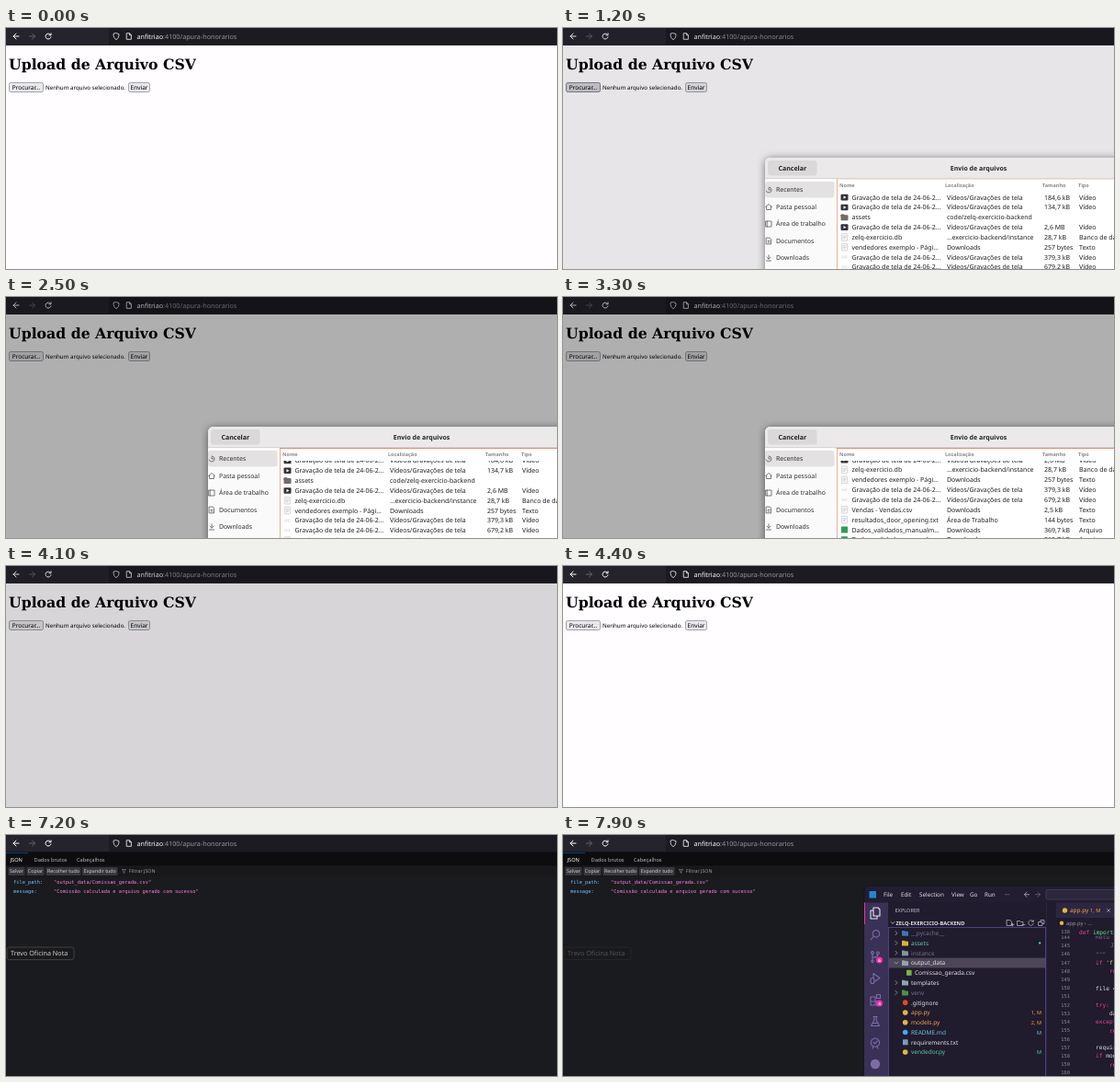
An HTML page that plays this animation: 600x262 px, repeating every 8000 ms.

```html
<!DOCTYPE html>
<html lang="pt-BR">
<head>
<meta charset="utf-8">
<title>Upload de Arquivo CSV</title>
<style>
html, body { margin: 0; width: 100%; height: 100%; overflow: hidden; background: #fffdff; }
svg { display: block; width: 600px; height: 262px; }
text { font-family: "Noto Sans", "Open Sans", sans-serif; white-space: pre; text-rendering: geometricPrecision; }
.mono { font-family: "DejaVu Sans Mono", monospace; }
.serif { font-family: "DejaVu Serif", serif; }
.bold { font-weight: 700; }
.mid { text-anchor: middle; }
.end { text-anchor: end; }
</style>
</head>
<body>
<svg id="stage" viewBox="0 0 600 262"></svg>
<script>
const LOOP = 8000, STEP = 100;
const stage = document.getElementById('stage');

// y is the vertical centre of the capitals
const text = (s, x, y, size, fill, cls = '') =>
  `<text x="${x}" y="${y + size * 0.36}" font-size="${size}" fill="${fill}" class="${cls}">${s}</text>`;
const rect = (x, y, w, h, fill, r = 0, extra = '') =>
  `<rect x="${x}" y="${y}" width="${w}" height="${h}" fill="${fill}" rx="${r}" ${extra}/>`;
const circle = (x, y, r, fill) => `<circle cx="${x}" cy="${y}" r="${r}" fill="${fill}"/>`;
const line = (x, y, d, color, w = 1) =>
  `<path transform="translate(${x} ${y})" d="${d}" fill="none" stroke="${color}" stroke-width="${w}" stroke-linecap="round" stroke-linejoin="round"/>`;
const group = (id, body) => `<g id="${id}">${body}</g>`;
const button = (id, label, x, w) => group(id,
  rect(x + .5, 59.5, w - 1, 10, '#e9e9ed', 1.8, 'stroke="#8f8f9d" stroke-width=".8"') +
  text(label, x + w / 2, 64.7, 6.5, '#000', 'mid'));

function browserBar() {
  const white = '#fbfbfe', gray = '#63626b';
  return rect(0, 0, 600, 18.7, '#1c1b22') + rect(0, 0, 112, 18, '#25242d') + rect(0, 18, 600, .7, '#121117') +
    line(11, 9, 'M3 0H-3M0 -3L-3 0L0 3', white) +
    line(28.5, 9, 'M-3 0H3M0 -3L3 0L0 3', gray) +
    line(46, 9, 'M2.6 -1.6A3 3 0 1 0 3 .8M3 -3.2V-1.2H1', white) +
    line(120, 9, 'M0 -3.4L3 -2.4C3 1 2 2.6 0 3.6C-2 2.6 -3 1 -3 -2.4Z', '#d5d4da', .9) +
    line(134, 9, 'M-2.4 -3.3H.6L2.4 -1.4V3.3H-2.4ZM.4 -3V-1.2H2.2', '#e5e4ea', .9) +
    text('<tspan fill="#fbfbfe">anfitriao</tspan>:4100/apura-honorarios', 142.5, 9.2, 7.2, '#97969e');
}

function uploadPage() {
  return rect(0, 18, 600, 244, '#fffdff') +
    text('Upload de Arquivo CSV', 3, 39.3, 15.7, '#000', 'serif bold') +
    button('browse', 'Procurar…', 3, 38) +
    group('file', text('Nenhum arquivo selecionado.', 43, 64.7, 6.2, '#000')) +
    button('send', 'Enviar', 133, 24);
}

const recording = 'Gravação de tela de 24-06-2…', recordings = 'Vídeos/Gravações de tela';
const files = [
  ['video', recording, recordings, '184,6 kB', 'Vídeo'],
  ['video', recording, recordings, '134,7 kB', 'Vídeo'],
  ['folder', 'assets', 'code/zelq-exercicio-backend', '', ''],
  ['video', recording, recordings, '2,6 MB', 'Vídeo'],
  ['doc', 'zelq-exercicio.db', '…exercicio-backend/instance', '28,7 kB', 'Banco de dados'],
  ['doc', 'vendedores exemplo - Pági…', 'Downloads', '257 bytes', 'Texto'],
  ['thumb', recording, recordings, '379,3 kB', 'Vídeo'],
  ['thumb', recording, recordings, '679,2 kB', 'Vídeo'],
  ['doc', 'Vendas - Vendas.csv', 'Downloads', '2,5 kB', 'Texto'],
  ['doc', 'resultados_door_opening.txt', 'Área de Trabalho', '144 bytes', 'Texto'],
  ['sheet', 'Dados_validados_manualm…', 'Downloads', '369,7 kB', 'Arquivo'],
  ['sheet', 'Dados_validados_manualm…', 'Downloads', '369,7 kB', 'Arquivo'],
];
const fileIcons = {
  video: y => rect(302.5, y - 3.2, 8, 6.6, '#333139', 1) + `<path d="M305.5 ${y - 1.6}l3 1.7l-3 1.7z" fill="#fff"/>`,
  folder: y => rect(302.5, y - 3.3, 4, 3, '#5d504f', .8) + rect(302.5, y - 2.5, 8, 6, '#776967', .8),
  doc: y => rect(303.3, y - 3.8, 6.4, 7.6, '#fafafa', .6, 'stroke="#bbb" stroke-width=".6"') +
    line(305, y, 'M0 -1.5H3M0 0H3M0 1.5H2', '#aaa', .5),
  thumb: y => rect(303, y - 2, 7, 4, '#f4f4f4') + line(304, y, 'M0 0H4', '#ddd', .6),
  sheet: y => rect(303, y - 3.6, 7, 7.2, '#2f9e56', .6),
};

function dialog() {
  const ink = '#1f1f1f';
  const places = [
    ['Recentes', 'M0 -3A3 3 0 1 1 -2.8 1M0 -1.6V0H1.6'],
    ['Pasta pessoal', 'M-3.4 0L0 -3L3.4 0M-2.4 -.6V3H2.4V-.6'],
    ['Área de trabalho', 'M-3 -3H3V3H-3ZM-1.8 -3V3'],
    ['Documentos', 'M-2.5 -3.4H1L2.5 -2V3.4H-2.5ZM-1 0H1M-1 1.6H1'],
    ['Downloads', 'M0 -3.2V1M-2 -.8L0 1.2L2 -.8M-2.6 3H2.6'],
  ];
  const columns = [['Nome', 301], ['Localização', 416], ['Tamanho', 522], ['Tipo', 561]];
  const rows = files.map(([kind, name, place, size, type], i) => {
    const y = 184 + i * 10.85;
    return fileIcons[kind](y) + text(name, 314.5, y, 7, ink) + text(place, 418, y, 7, ink) +
      text(size, 524, y, 7, ink) + text(type, 562, y, 7, ink);
  }).join('');
  return rect(220, 141, 400, 140, '#fafafa', 6, 'filter="url(#shadow)"') +
    `<path d="M220 164V147a6 6 0 0 1 6-6H600V164Z" fill="#ebe9e9"/>` +
    rect(220, 163.2, 380, .8, '#d3d0d0') +
    rect(223, 144, 53.5, 16.5, '#dad8d8', 3) +
    text('Cancelar', 249.8, 152.4, 7, '#222', 'mid bold') +
    text('Envio de arquivos', 452.5, 152.4, 7, '#222', 'mid bold') +
    rect(220, 167, 75.5, 17.5, '#e3e1e1', 3) +
    places.map(([label, icon], i) =>
      line(224, 176 + i * 18.5, icon, '#5a5a5a', .8) + text(label, 232, 176 + i * 18.5, 6.9, '#2c2c2c')).join('') +
    rect(298, 164, 302, 98, '#fff') +
    `<g clip-path="url(#list)">${group('rows', rows)}</g>` +
    columns.map(([label, x]) => text(label, x, 171, 5.5, '#8c8a8a', 'bold')).join('') +
    rect(298, 164, .9, 98, '#eba58c') + group('focus', rect(298, 164, 302, 1, '#ea8a6a'));
}

function jsonPage() {
  const ink = '#b9b9be';
  const chip = (label, x, w) => rect(x, 35, w, 9, '#38383d', 1) + text(label, x + w / 2, 39.5, 5.3, '#cfcfd4', 'mid');
  const entry = (key, value, y) => text(key, 8, y, 5.35, '#75bfff', 'mono') + text(`"${value}"`, 52, y, 5.35, '#f57de0', 'mono');
  return rect(0, 18, 600, 244, '#1a1b1e') + rect(0, 18, 600, 15.5, '#0d0d0f') + rect(0, 33.5, 600, 12, '#18181a') +
    rect(0, 18.7, 24, .8, '#0a6fd0') +
    text('JSON', 4.5, 26.5, 5.7, '#fff') + text('Dados brutos', 30.5, 26.5, 5.7, ink) + text('Cabeçalhos', 77, 26.5, 5.7, ink) +
    chip('Salvar', 2.5, 18) + chip('Copiar', 22.5, 19) + chip('Recolher tudo', 43.5, 38) + chip('Expandir tudo', 83, 38.5) +
    line(128.5, 39.5, 'M-2 -2H2L.5 0V2L-.5 1.5V0Z', '#8b8b90', .6) + text('Filtrar JSON', 134, 39.5, 5.3, '#a0a0a5') +
    entry('file_path:', 'output_data/Comissao_gerada.csv', 50.7) +
    entry('message:', 'Comissão calculada e arquivo gerado com sucesso', 60.7);
}

function editor() {
  const ink = '#e1e1e6', dim = '#77718a', amber = '#f3a04e', teal = '#58cfa8';
  const pink = '#f92aad', keyword = '#e8439f', back = '#201b2d', accent = '#5d4a8c';
  const menu = [['File', 349], ['Edit', 368], ['Selection', 388], ['View', 423], ['Go', 443], ['Run', 459], ['···', 481]];
  // name, text colour, icon colour, kind, status
  const tree = [
    ['__pycache__', dim, '#3d78b0', '>'],
    ['assets', teal, '#d9b13b', '>', '●'],
    ['instance', dim, '#8193a0', '>'],
    ['output_data', ink, '#90a4ae', 'v'],
    ['Comissao_gerada.csv', ink, '#7cb342', 'child'],
    ['templates', ink, '#90a4ae', '>'],
    ['venv', dim, '#4f8f4c', '>'],
    ['.gitignore', ink, '#e64a19', 'dot'],
    ['app.py', amber, '#e0b840', 'dot', '1, M'],
    ['models.py', amber, '#e0b840', 'dot', '2, M'],
    ['README.md', '#6fc5e8', '#42a5f5', 'dot', 'M'],
    ['requirements.txt', ink, '#7a9cc0', 'doc'],
    ['vendedor.py', teal, '#e0b840', 'dot', 'M'],
  ].map(([name, color, icon, kind, status], i) => {
    const y = 106.7 + i * 10.78, x = kind === 'child' ? 383 : 379, folder = kind === '>' || kind === 'v';
    return (kind === 'v' ? rect(355, y - 5.4, 171, 10.8, '#4d4659') : '') +
      (folder ? line(363, y, kind === 'v' ? 'M-2 -1L0 1L2 -1' : 'M-1 -2L1 0L-1 2', '#a9a4b5', .8) +
        rect(369, y - 2.8, 3.2, 2, icon, .5) + rect(369, y - 2, 7, 5, icon, .6)
        : kind === 'dot' ? circle(372.7, y, 2.8, icon) : rect(x - 9, y - 3, 5.6, 6, icon, .6)) +
      text(name, x, y, 6.5, color) + (status ? text(status, 521, y, 5.6, color, 'end') : '');
  }).join('');
  const activity = [
    'M-2 -6H3L5 -4V3H-2ZM-2 -3H-5V6H2V3',
    'M1 -5A3.8 3.8 0 1 1 .9 -5M-2 2L-5 5.5',
    'M-3 -3V4M-3 1C0 1 3 1 3 -2M-3 -5.5A1.4 1.4 0 1 1 -3.1 -5.5M3 -5A1.4 1.4 0 1 1 2.9 -5M-3 4A1.2 1.2 0 1 1 -3.1 4',
    'M-2 -5L5 0L0 3.5M-2 -5V0M-5 2A2 2 0 1 1 -1 2V4A2 2 0 1 1 -5 4Z',
    'M-5 -3H0V2H5V6H-5ZM-5 2H0V6M1.5 -5.5H5.5V-1.5H1.5Z',
    'M-2 -5H2M-1.2 -5V-1L-4.5 5H4.5L1.2 -1V-5M-2.8 2H2.8',
    'M0 -5A4.6 4.6 0 1 1 -.1 -5M-2 -.5L-.5 1L2.4 -2M-2 4L-3 6M2 4L3 6',
  ].map((d, i) => line(340, 85 + i * 23.5, d, i ? '#7c6ca6' : '#e8e4f2', 1.1)).join('');
  const badge = (label, y) => circle(344.5, y, 3.6, pink) + text(label, 344.5, y, 4.6, '#fff', 'mid bold');
  const code = [
    [144, 'Retu', 580, dim], [145, 'JS', 596, dim], [146, '"""', 580, dim],
    [147, `<tspan fill="${keyword}">if</tspan> 'f`, 580, '#e7de79'], [148, 'return', 595, keyword], [149],
    [150, 'file =', 580, ink], [151], [152, 'try:', 580, keyword], [153, 'data', 595, ink],
    [154, 'except', 580, keyword], [155, 'return', 595, keyword], [156], [157, 'required', 580, ink],
    [158, `<tspan fill="${keyword}">if</tspan> mode`, 580, ink], [159, 'return', 595, keyword], [160],
  ].map(([n, s, x, color], i) => {
    const y = 111 + i * 9.22;
    return text(n, 552, y, 5.4, '#8a849d', 'mono end') + (s ? text(s, x, y, 6.2, color, 'mono') : '');
  }).join('');
  return rect(328, 55, 290, 230, '#221d31', 5, 'stroke="#15121d" stroke-width=".8"') +
    rect(328, 73.5, 26, 190, '#3a3156') + rect(354, 73.5, 172, 190, back) +
    rect(526, 73.5, 74, 190, back) + rect(537, 73.5, 63, 16.5, '#2c2640') + rect(526, 73.5, .8, 190, '#2f2846') +
    rect(328, 73.5, 1, 23.5, pink) +
    rect(333.5, 61, 7.5, 7.5, '#2486cf') +
    menu.map(([label, x]) => text(label, x, 64.7, 6.3, ink)).join('') +
    line(505, 64.7, 'M2.6 0H-2.6M0 -2.5L-2.6 0L0 2.5', '#b5b0c2', .8) +
    line(517, 64.7, 'M-2.6 0H2.6M0 -2.5L2.6 0L0 2.5', '#6b657a', .8) +
    rect(526, 59.5, 90, 10.5, '#2d273c', 2, 'stroke="#4b445c" stroke-width=".7"') +
    activity + circle(340, 249, 5.2, '#7c6ca6') + badge('6', 136) + badge('4', 183) +
    text('EXPLORER', 361.5, 81.5, 5.6, '#c4c0cf') +
    line(359, 95.5, 'M-1.8 -1L0 1L1.8 -1', '#c4c0cf', .8) +
    text('ZELQ-EXERCICIO-BACKEND', 362.5, 95.5, 5.7, ink, 'bold') +
    line(486, 95.5, 'M-2.5 -3H1L2.5 -1V3H-2.5ZM2 2H5M3.5 .5V3.5', '#c4c0cf', .7) +
    line(498, 95.5, 'M-3 -2H-.5L.5 -1H3V3H-3ZM2 2H5', '#c4c0cf', .7) +
    line(509.5, 95.5, 'M2.4 -1.6A2.8 2.8 0 1 0 2.8 .8M2.8 -3V-1.4H1', '#c4c0cf', .7) +
    line(521, 95.5, 'M-3 -1H1V3H-3ZM-1 -1V-3H3V1H1', '#c4c0cf', .7) +
    tree + rect(354.5, 100.5, 171, 170, 'none', 0, `stroke="${accent}" stroke-width=".8"`) +
    circle(546.5, 82, 2.7, '#e0b840') + text('app.py', 552, 82, 6.4, amber) + text('1, M', 574, 82, 5.6, amber) +
    line(594, 82, 'M-1.6 -1.6L1.6 1.6M1.6 -1.6L-1.6 1.6', '#b5b0c2', .7) +
    circle(543, 95.8, 2.2, '#e0b840') + text('app.py › …', 548, 95.8, 5.8, '#9a94a9') +
    code + rect(532, 101, 68, 8.5, back) + text('138', 552, 105.5, 5.4, '#8a849d', 'mono end') +
    text(`<tspan fill="${keyword}">def</tspan> importar`, 562, 105.5, 6.2, '#67e480', 'mono');
}

const tooltip = () => rect(1, 122, 73, 13.5, '#1a1a1c', 2.5, 'stroke="#4a4a4c" stroke-width=".8"') +
  text('Trevo Oficina Nota', 5, 128.8, 7.2, '#d0d0d2');

stage.innerHTML = `<defs>
  <filter id="shadow" x="-10%" y="-20%" width="120%" height="140%"><feDropShadow dx="0" dy="1" stdDeviation="4" flood-opacity=".5"/></filter>
  <clipPath id="list"><path d="M298 178H600V262H298Z"/></clipPath></defs>` +
  group('upload', uploadPage()) + group('json', jsonPage()) + browserBar() +
  rect(0, 0, 600, 262, '#000', 0, 'id="dim"') +
  group('dialog', dialog()) + group('tip', tooltip()) + group('editor', editor());

const $ = id => document.getElementById(id);
const ramp = (t, a, b) => Math.min(1, Math.max(0, (t - a) / (b - a)));
const smooth = k => k * k * (3 - 2 * k);
const set = (id, name, value) => $(id).setAttribute(name, value);
const show = (id, opacity) => {
  set(id, 'opacity', opacity);
  set(id, 'display', opacity > 0 ? 'inline' : 'none');
};
const buttonStyles = { normal: ['#e9e9ed', '#8f8f9d'], hover: ['#d0d0d7', '#676774'], active: ['#b1b1b9', '#484851'] };
function paint(id, state) {
  const box = $(id).querySelector('rect'), [fill, stroke] = buttonStyles[state];
  box.setAttribute('fill', fill);
  box.setAttribute('stroke', stroke);
}

function render(t) {
  const chosen = t >= 5000, loaded = t >= 6900;
  show('upload', loaded ? 0 : 1);
  show('json', loaded ? 1 : 0);
  paint('browse', t < 100 || t >= 1300 ? 'normal' : t >= 700 && t < 900 ? 'active' : 'hover');
  paint('send', t < 6000 ? 'normal' : t < 6600 ? 'hover' : 'active');
  $('file').firstChild.textContent = chosen ? 'Vendas - Vendas.csv' : 'Nenhum arquivo selecionado.';
  set('send', 'transform', `translate(${chosen ? -9 : 0} 0)`);

  show('dim', 0.31 * (ramp(t, 1050, 1550) - ramp(t, 3950, 4250)));
  const open = ramp(t, 950, 1100) - ramp(t, 3800, 3950);
  show('dialog', open);
  set('dialog', 'transform', `translate(0 ${250 * (1 - open)}) scale(1 ${open})`);
  show('focus', ramp(t, 1100, 1500));
  set('rows', 'transform', `translate(0 ${-39.5 * smooth(ramp(t, 2300, 3100))})`);

  show('tip', ramp(t, 7000, 7200) - ramp(t, 7600, 8030));
  const grow = smooth(ramp(t, 7300, 7700));
  show('editor', grow);
  set('editor', 'transform', `translate(0 ${128 * (1 - grow)}) scale(${grow})`);
}

function tick() {
  const t = performance.now() % LOOP;
  render(Math.floor(t / STEP) * STEP);
  requestAnimationFrame(tick);
}
tick();
</script>
</body>
</html>
```
